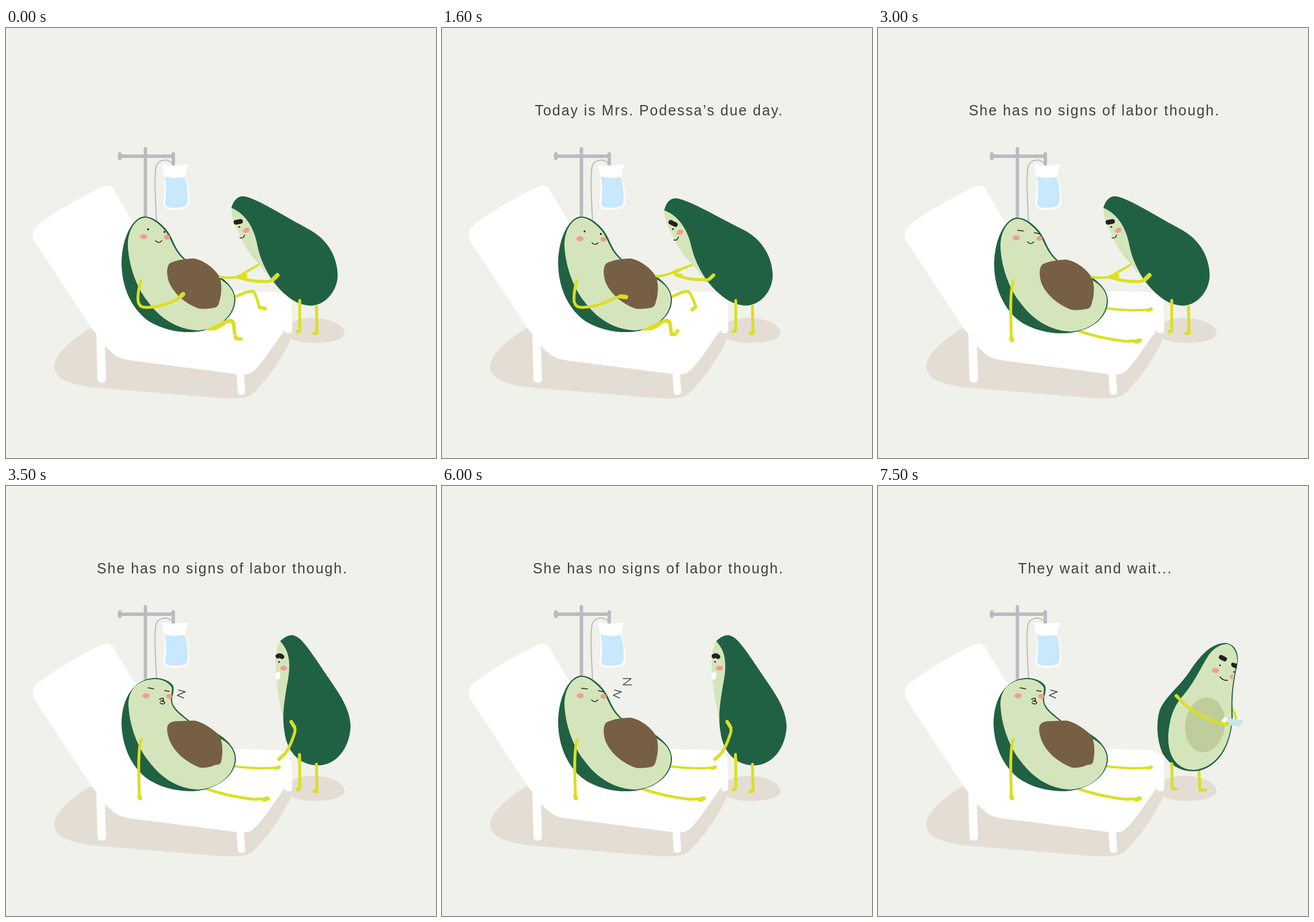
Write an HTML page that moves like this. It is 748x748 px and loops after 8 s.

```html
<!DOCTYPE html>
<html lang="en">
<head>
<meta charset="utf-8">
<title>Due day</title>
<style>
  html, body { margin: 0; width: 100%; height: 100%; overflow: hidden; background: #f0f1eb; }
  svg { display: block; width: 100vw; height: 100vh; }
  text { font: 25px "Liberation Sans", Arial, sans-serif; letter-spacing: 1.95px; fill: #414042; }
  .skin { fill: #216143; }
  .flesh { fill: #d5e5bb; }
  .pit { fill: #775f44; }
  .blush { fill: #f09e8b; }
  .ink { fill: #231f20; }
  .limb, .line, .brow, .metal, .hand { fill: none; stroke-linecap: round; stroke-linejoin: round; }
  .limb { stroke: #d9e021; stroke-width: 5; }
  .hand { stroke: #d9e021; stroke-width: 7.5; }
  .thin { stroke-width: 4; }
  .small { stroke-width: 6; }
  .thigh { fill: #d9e021; }
  .line { stroke: #231f20; stroke-width: 1.5; }
  .brow { stroke: #231f20; stroke-width: 8; }
  .metal { stroke: #bbbac0; stroke-width: 6; }
  .tube { stroke-width: 2; }
  .z { stroke: #4a4a4a; }
</style>
</head>
<body>
<svg viewBox="0 0 748 748">
  <defs>
    <g id="recline">
      <path class="skin" d="M240 328C222 329 201 362 201 411C202 460 225 495 250 511C275 525 300 530 325 529C365 527 399 505 399 472C398 455 388 444 372 432L312 402C293 385 294 372 280 352C267 336 252 327 240 328Z"/>
      <path class="flesh" d="M241 330C224 332 212 353 212 378C213 410 226 450 246 475C269 507 300 525 335 526C370 524 398 500 397 470C396 455 386 445 371 436L311 404C292 388 291 374 278 354C266 340 252 329 241 330Z"/>
      <path class="pit" d="M284 410C295 403 315 401 328 401C346 405 362 418 371 432C376 444 376 462 370 480Q368 486 361 487Q345 490 335 488C312 479 292 463 283 441Q277 420 284 410Z"/>
    </g>
    <g id="cheeks">
      <ellipse class="blush" cx="239.5" cy="363" rx="6.3" ry="4.4"/>
      <ellipse class="blush" cx="280" cy="364" rx="5.3" ry="4.3"/>
    </g>
    <path id="smile" class="line" d="M260 370Q266 376 271 370"/>
    <g id="awake">
      <circle class="ink" cx="247.3" cy="350.3" r="1.7"/><circle class="ink" cx="275.6" cy="354.8" r="1.7"/>
      <use href="#cheeks"/><use href="#smile"/>
    </g>
    <path id="thigh" class="thigh" d="M345 526L384 507Q396 503 399 514L401 534L395 534L393 516Q390 510 383 514Q372 524 362 526Z"/>
    <g id="leaner">
      <path class="flesh" d="M392 312C392 335 402 350 411 370C420 393 444 412 463 441C470 400 440 320 392 312Z"/>
      <path class="skin" d="M392 313C396 298 405 291 415 293C437 297 480 325 530 352C563 371 577 402 577 432C575 462 552 483 530 483C500 483 475 455 462 437C445 410 440 392 436 372C430 345 415 322 392 313Z"/>
      <circle class="ink" cx="406" cy="346" r="1.5"/>
      <ellipse class="blush" cx="418" cy="352" rx="6" ry="4.2" transform="rotate(-18 418 352)"/>
      <path class="line" d="M407 365Q414 366 415 360"/>
    </g>
    <g id="stance">
      <path class="limb" d="M511 474V526M540 484L541 530"/>
      <path class="hand small" d="M507 528L510 527M536 531.500L540 531"/>
    </g>
    <g id="sleepLimbs">
      <path class="limb" d="M340 524Q385 540 430 545L455 544"/>
      <path class="limb thin" d="M392 487Q440 493 470 490"/>
      <path class="hand" d="M449 545.500L455 543.500"/><path class="hand small" d="M470 491L475 489"/>
    </g>
    <g id="sleepArm">
      <path class="limb" d="M235 441C229 465 231 500 232 540"/>
      <path class="hand" d="M232 540L233 543"/>
    </g>
  </defs>

  <g fill="#e4ddd4">
    <path d="M150 520C110 545 84 568 84 590C85 612 115 620 150 625L340 641C390 645 412 647 428 637C455 612 482 572 496 540L490 500Z"/>
    <path d="M485 526C490 512 510 504 535 504C567 505 589 518 589 531C587 542 565 548 535 548C515 548 490 544 485 526Z"/>
  </g>
  <path fill="#fff" d="M49 350C58 336 120 299 165 277C180 270 187 277 192 290L222 340L380 457L465 459Q497 461 497 480L498 525Q498 531 491 531Q485 531 485 525C462 556 445 586 428 599Q420 603 414 602L416 632Q416 638 409 638Q403 638 403 632L401 602L215 578Q195 575 186 566L172 553L174 610Q174 617 167 617Q159 617 159 610L157 532L150 524L50 372Q43 362 49 350Z"/>
  <path class="metal" d="M242.500 210V345M197 223H291M198 219V227M291 219V240"/>
  <path class="metal tube" d="M290 238C288 228 266 225 261 241C258 255 260 305 262.500 345"/>
  <path fill="#fff" d="M271 238Q295 241 318 237Q311 247 313 262Q319 280 319 300Q319 313 310 314Q295 318 280 315Q273 312 274 300Q278 280 275 262Q274 248 271 238Z"/>
  <path fill="#c7e8fd" d="M276 258Q290 263 311 259Q317 280 316 300Q316 309 308 311Q295 314 283 312Q276 310 277 302Q281 280 276 258Z"/>

  <g id="patientAwakeA">
    <path class="limb" d="M396 469Q420 457 430 458Q435 463 440 484"/><path class="hand small" d="M441 486L451 488"/>
    <use href="#recline"/><use href="#awake"/><use href="#thigh"/>
    <path class="hand small" d="M399 537L400 540L409 541"/>
    <path class="limb" d="M234 440C226 475 228 487 245 486C270 485 290 479 307 465"/><path class="hand" d="M305 466L308 463"/>
  </g>
  <g id="patientSleepD">
    <use href="#sleepLimbs"/><use href="#recline" transform="translate(1 2)"/>
    <use href="#cheeks" transform="translate(1 2)"/><use href="#smile" transform="translate(0 2)"/>
    <path class="line" d="M243 352L253 353M272 356L281 358"/>
    <use href="#sleepArm"/>
  </g>
  <g id="patientSleepC">
    <use href="#sleepLimbs"/>
    <path class="skin" d="M258 334C230 335 201 360 201 415C203 463 225 496 250 512C275 527 300 531 325 531C365 529 400 505 400 474C399 457 388 444 370 432L320 409C302 394 289 385 289 372C289 365 293 358 291 348C287 340 272 333 258 334Z"/>
    <path class="flesh" d="M258 336C232 337 213 352 213 380C214 412 227 452 247 477C270 509 300 527 335 528C370 526 398 502 398 474C397 456 386 446 369 437L318 410C300 396 287 386 287 372C286 364 290 358 288 350C283 341 270 335 258 336Z"/>
    <path class="pit" d="M283 414Q287 409 300 409L328 408C345 412 362 424 372 435C377 448 378 464 374 481Q372 485 365 485Q352 491 338 490C314 481 292 463 284 441Q277 421 283 414Z"/>
    <use href="#cheeks" transform="translate(4 2)"/>
    <path class="line" d="M247 351L257 353M276 356L284 357M267 371Q274 367 274 371Q273 375 269 374Q277 374 276 378Q272 381 268 377"/>
    <use href="#sleepArm"/>
  </g>
  <g id="leanA">
    <path class="limb thin" d="M372 433Q390 436 403 433L439 412"/>
    <use href="#leaner"/><path class="brow" d="M400 338L408 336.500"/>
    <path class="limb" d="M473 430Q464 440 455 441Q430 442 405 434"/>
    <path class="hand" d="M465 437L472 430M404 433L416 431"/>
    <use href="#stance"/>
  </g>
  <g id="patientAwakeB">
    <path class="limb" d="M397 469Q420 457 428 458Q434 462 441 484"/><path class="hand small" d="M441 485L435 490"/>
    <use href="#recline" transform="translate(1)"/><use href="#awake" transform="translate(.7 3.500)"/><use href="#thigh" transform="translate(1)"/>
    <path class="hand small" d="M400 533L405 533L410 527"/>
    <path class="limb" d="M234 440C226 475 228 487 245 486C285 484 295 468 312 467"/><path class="hand" d="M311 467L320 468"/>
  </g>
  <g id="leanB">
    <path class="limb thin" d="M373 432Q392 431 408 422L436 412"/>
    <g transform="rotate(-1.9 520 480)"><use href="#leaner"/></g><path class="brow" d="M398 338L406 342"/>
    <path class="limb" d="M473 430Q464 440 455 438Q425 438 406 429"/>
    <path class="hand small" d="M465 437L472 430M404 424L413 421M407 429L416 431"/>
    <use href="#stance"/>
  </g>
  <g id="standing">
    <path class="flesh" d="M477 269C471 280 469 293 469 310C470 350 477 385 484 410L490 350C505 300 480 270 477 269Z"/>
    <path class="skin" d="M477 270C485 262 495 257 503 261C515 265 530 288 555 325C580 362 598 385 599.500 418C598 455 575 486 543 486C510 486 488 462 484 425C480 400 484 375 489 345C496 310 494 288 477 270Z"/>
    <path class="brow" d="M473 296Q477 294 480 297"/>
    <circle class="ink" cx="475" cy="306" r="1.500"/><ellipse class="blush" cx="483" cy="317" rx="6.200" ry="4.200"/>
    <path fill="#fff" d="M469 326Q475 320 477 326L477 334Q474 338 470 336Z"/>
    <path class="limb" d="M497 411Q505 420 502 430Q494 455 485 466L475 475"/>
    <path class="hand small" d="M496 410L502 420M484 467L475 475"/>
    <use href="#stance"/>
    <path class="limb" d="M510.500 467V480"/>
  </g>
  <g id="phoning">
    <path class="limb" d="M558 490L560 529L570 529"/>
    <path class="limb thin" d="M615 386Q622 396 623 405"/>
    <path class="skin" d="M603 273C618 274 627 285 626 305C622 330 615 350 617 400C616 440 600 484 560 495C535 500 510 490 495 465C484 440 484 410 490 390C500 365 525 350 545 318C565 290 580 275 603 273Z"/>
    <path class="flesh" d="M606 275C616 275 625 288 625 305C620 330 613 350 615 405C613 450 590 490 550 494C520 494 503 470 505 432C507 405 514 386 526 370C548 347 560 318 576 293C586 280 598 275 606 275Z"/>
    <ellipse fill="#bfcd9a" cx="569" cy="415.500" rx="34.500" ry="48" transform="rotate(8 569 415)"/>
    <path class="brow" d="M597 298L603 301"/><path class="ink" d="M616 307L624 309L624 318L617 315Q612 311 616 307Z"/>
    <path class="blush" d="M618 327Q612 328 612 332Q613 336 617 336Z"/>
    <ellipse class="blush" cx="587" cy="321" rx="6.200" ry="4.200" transform="rotate(10 587 321)"/>
    <circle class="ink" cx="595" cy="312" r="1.400"/><circle class="ink" cx="619.500" cy="323.500" r="1.400"/>
    <path class="line" d="M595 332Q600 339 608 338"/>
    <path fill="#fff" d="M602 402L611 404L605 416L596 412Z"/>
    <path fill="#c7e6ec" d="M608 404L636 408L629 419L602 415Z"/>
    <path class="limb" d="M520 366C535 385 570 409 607 415"/><path class="hand small" d="M519 365L522 368M601 414L608 414"/>
    <path class="limb" d="M511 483L512 526L519 527"/>
  </g>

  <path id="z1" class="line z" d="M300 355L312 358L298 364L309 369"/>
  <path id="z2" class="line z" d="M315 335L329 335L315 346L330 346"/>
  <path id="z3" class="line z" d="M333 315L345 318L331 325L343 328"/>
  <text id="dueDay" x="161.500" y="152">Today is Mrs. Podessa’s due day.</text>
  <text id="noSigns" x="158" y="152">She has no signs of labor though.</text>
  <text id="waiting" x="243.500" y="152">They wait and wait...</text>
</svg>
<script>
  const LOOP = 8000, BEAT = 500;
  const show = (id, opacity) => {
    const el = document.getElementById(id);
    el.style.display = opacity ? "" : "none";
    el.style.opacity = Number(opacity);
  };

  function draw(now) {
    const t = now % LOOP, beat = Math.floor(t / BEAT), odd = beat % 2;
    const awake = beat < 6, leaning = beat < 7;
    // Two of the pose changes pass through a short blend.
    const blend = (beat === 2 || beat === 3) && t % BEAT < 100;
    const poseA = !odd || blend, poseB = blend ? 0.5 : odd;

    show("patientAwakeA", awake && poseA);
    show("patientAwakeB", awake && poseB);
    show("leanA", leaning && poseA);
    show("leanB", leaning && poseB);
    show("patientSleepD", !awake && !odd);
    show("patientSleepC", !awake && odd);
    show("standing", beat >= 7 && beat < 14);
    show("phoning", beat >= 14);

    const snores = awake ? 0 : (beat - 6) % 4;
    for (const n of [1, 2, 3]) show("z" + n, n <= snores);

    show("dueDay", beat >= 2 && awake);
    show("noSigns", beat >= 6 && beat < 15);
    show("waiting", beat === 15);
    requestAnimationFrame(draw);
  }
  draw(performance.now());
</script>
</body>
</html>
```
